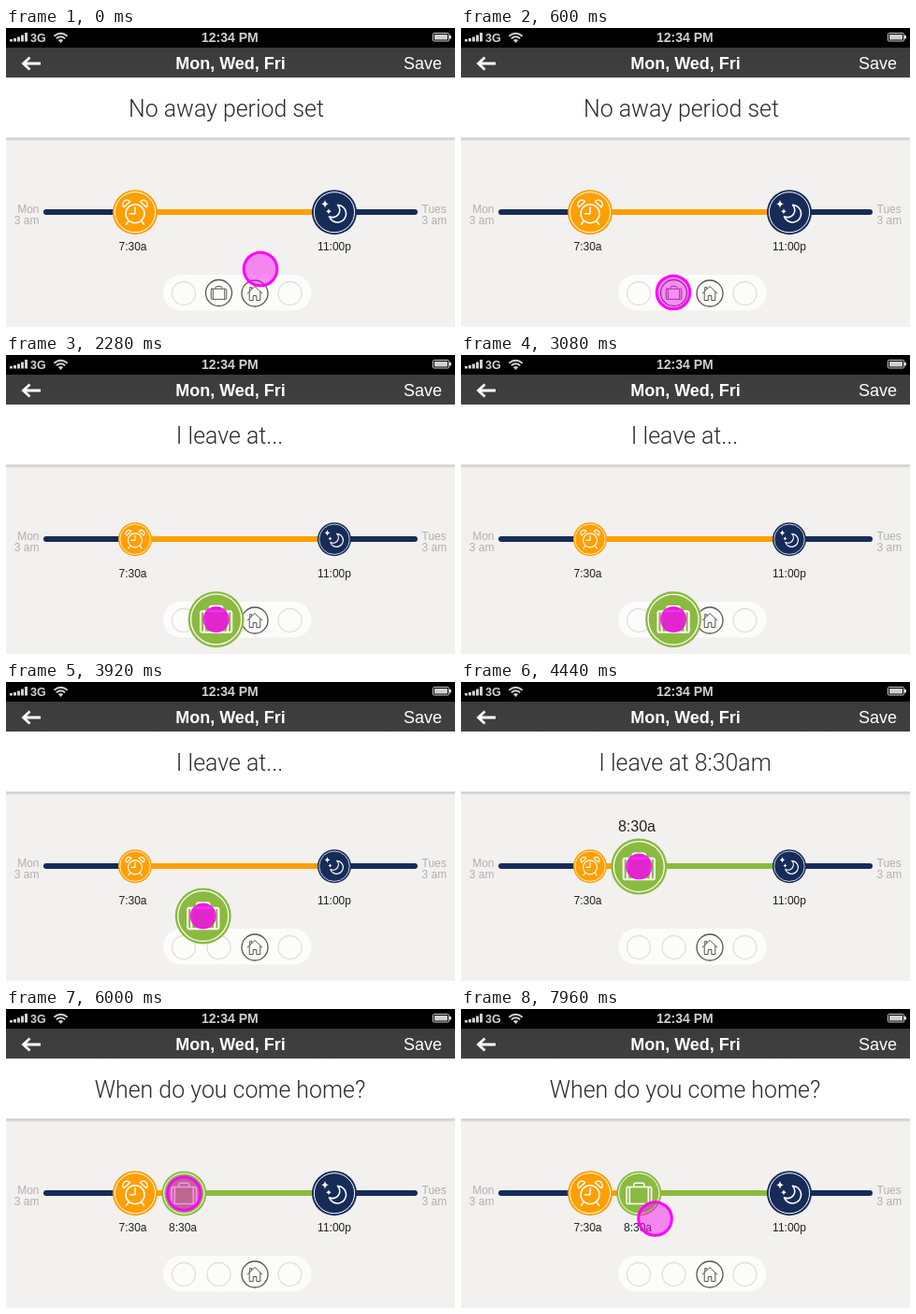
An HTML page for the animation above (8 s loop, 480x320 px).

```html
<!DOCTYPE html>
<html lang="en">
<head>
<meta charset="utf-8">
<title>Away period</title>
<style>
  html, body { margin: 0; width: 100%; height: 100%; overflow: hidden; background: #f2f1ef; }
  svg { display: block; width: 480px; height: 320px; font-family: "Liberation Sans", Arial, sans-serif; }
  .line { fill: none; stroke: currentColor; stroke-linecap: round; stroke-linejoin: round; }
  .title { font: 300 24.9px Roboto, sans-serif; fill: #2b2b2b; text-anchor: middle; }
  .time { font-size: 12px; fill: #222; text-anchor: middle; }
  .end { font-size: 12px; fill: #b1b0ae; }
  .slot { fill: none; stroke: #e0dfdd; stroke-width: 1.3; }
</style>
</head>
<body>
<svg viewBox="0 0 480 320">
  <defs>
    <linearGradient id="bar" x2="0" y2="1">
      <stop offset="0" stop-color="#3b3b3b"/><stop offset="1" stop-color="#404040"/>
    </linearGradient>
    <linearGradient id="shade" x2="0" y2="1">
      <stop offset="0" stop-color="#b9b8b6"/><stop offset="1" stop-color="#f2f1ef"/>
    </linearGradient>
    <g id="badge">
      <circle r="24" fill="currentColor"/>
      <circle r="21.6" fill="none" stroke="#fff"/>
    </g>
    <g id="clock" class="line" stroke-width="1.5">
      <circle cy="1.500" r="10"/>
      <path d="M0-5.500V1.500H-5.500M-7 9.500L-9.500 13M7 9.500L9.500 13"/>
      <path d="M-12-5.500A4.400 4.400 0 0 1-5.500-11.500ZM12-5.500A4.400 4.400 0 0 0 5.500-11.500Z"/>
    </g>
    <g id="moon" class="line" stroke-width="1.6">
      <path d="M3.500-7.800A9.300 9.300 0 1 1-5.500 4.500A7.700 7.700 0 0 0 3.500-7.800Z"/>
      <path fill="currentColor" stroke="none" d="M-10-13.500Q-9.500-9.500-6-9Q-9.500-8.500-10-4.500Q-10.500-8.500-14-9Q-10.500-9.500-10-13.500Z
        M-6-4Q-5.700-1.300-3.200-1Q-5.700-.7-6 2Q-6.300-.7-8.800-1Q-6.300-1.300-6-4Z"/>
    </g>
    <g id="case" class="line" stroke-width="1.6">
      <rect x="-13.300" y="-7" width="26.600" height="18" rx="1.500"/>
      <path d="M-5.500-7.500V-9.500Q-5.500-11.300-3.700-11.300H3.700Q5.500-11.300 5.500-9.500V-7.500M-10-6.500V10.500M10-6.500V10.500"/>
    </g>
    <g id="home" class="line" stroke-width="1">
      <path d="M-7.800 0L0-7.500L7.800 0M-5.800-1.500V7.500H-1.800V2.500H1.800V7.500H5.800V-1.500M-5.300-2.800V-6.500H-3.300V-4.700"/>
    </g>
  </defs>

  <rect width="480" height="320" fill="#f2f1ef"/>
  <rect y="117" width="480" height="4" fill="url(#shade)"/>
  <rect y="53" width="480" height="64.500" fill="#fff"/>
  <rect y="21" width="480" height="32" fill="url(#bar)"/>
  <rect width="480" height="21" fill="#000"/>

  <g fill="#d0d0d0">
    <path d="M4 12h3v2.500h-3zM8 11h3v3.500h-3zM12 9.500h3v5h-3zM16 7.500h3v7h-3zM20 5h3v9.500h-3z"/>
    <text x="26" y="14.500" font-size="12.500" font-weight="700">3G</text>
    <path d="M58.500 16L55.800 13Q58.500 11 61.200 13Z"/>
    <path d="M53.800 11.300Q58.500 7.300 63.200 11.300M51.300 8.700Q58.500 2.900 65.700 8.700" fill="none" stroke="#d0d0d0" stroke-width="1.800"/>
    <text x="239.400" y="14.800" font-size="14" font-weight="700" text-anchor="middle">12:34 PM</text>
    <rect x="456.500" y="5.500" width="17" height="8.500" rx="1" fill="none" stroke="#d0d0d0"/>
    <path d="M458 7h14v5.500h-14zM474 8h2v3.500h-2z"/>
  </g>
  <g fill="#fff">
    <path d="M37 38H19M25.500 31.500L18.500 38L25.500 44.500" fill="none" stroke="#fff" stroke-width="2.800"/>
    <text x="240" y="44" font-size="18" font-weight="700" text-anchor="middle">Mon, Wed, Fri</text>
    <text x="425" y="44" font-size="18">Save</text>
  </g>
  <text id="title" class="title" y="95"></text>

  <g class="end">
    <text x="35.500" y="197.500" text-anchor="end">Mon</text>
    <text x="35.500" y="209.700" text-anchor="end">3 am</text>
    <text x="444.500" y="197.500">Tues</text>
    <text x="444.500" y="209.700">3 am</text>
  </g>
  <g fill="none" stroke-width="6">
    <path d="M43 197H437" stroke="#162b58" stroke-linecap="round"/>
    <path d="M138 197H351" stroke="#ff9f00"/>
    <path id="away" d="M190 197H351" stroke="#8bba40"/>
  </g>
  <text class="time" x="135.500" y="237.500">7:30a</text>
  <text class="time" x="351" y="237.500">11:00p</text>
  <text id="leave" class="time">8:30a</text>

  <g id="wake"><use href="#badge" color="#ff9f00"/><use href="#clock" color="#fff"/></g>
  <g id="night"><use href="#badge" color="#162b58"/><use href="#moon" color="#fff"/></g>

  <rect x="168" y="264" width="158.500" height="38.500" rx="19.200" fill="#fcfcfb"/>
  <circle class="slot" cx="190" cy="284" r="12.500"/>
  <circle class="slot" cx="227.500" cy="284" r="12.500"/>
  <circle class="slot" cx="303.500" cy="284" r="12.500"/>
  <g transform="translate(266 284)" color="#555">
    <circle class="line" r="14" stroke-width="1.300"/>
    <use href="#home"/>
  </g>
  <g id="idle" transform="translate(227.500 283.500)" color="#555">
    <circle r="14" fill="#fcfcfb" stroke="#555" stroke-width="1.300"/>
    <use href="#case" transform="scale(.62)"/>
  </g>
  <g id="bag"><use href="#badge" color="#8bba40"/><use href="#case" color="#fff"/></g>
  <circle id="touch" stroke="#f0f" fill="#f505ee"/>
</svg>

<script>
const LOOP = 8000, STEP = 40;
const $ = id => document.getElementById(id);
const set = (id, attrs) => { for (const k in attrs) $(id).setAttribute(k, attrs[k]); };
const show = (id, on) => set(id, { visibility: on ? 'visible' : 'hidden' });

const linear = p => p;
const easeIn = p => p * p;
const easeOut = p => 1 - (1 - p) ** 2;
const easeBoth = p => p * p * (3 - 2 * p);

// key: [time, value, ease into this key]
function track(keys, t) {
  const i = keys.findIndex(k => k[0] > t);
  if (i < 0) return keys[keys.length - 1][1];
  if (i === 0) return keys[0][1];
  const [t0, a] = keys[i - 1], [t1, b, ease = linear] = keys[i];
  return a + (b - a) * ease((t - t0) / (t1 - t0));
}

const fingerX = [[0, 272], [600, 227, easeOut], [3520, 227], [4360, 192, easeBoth], [4440, 190.3], [7680, 190.3], [7960, 207.5, easeIn]];
const fingerY = [[0, 258], [600, 283, easeOut], [3520, 283], [4360, 213, easeBoth], [4440, 197.5], [7680, 197.5], [7960, 224.5, easeIn]];
const press = [[1400, 0], [1640, 1, easeBoth], [5720, 1], [6000, 0, easeBoth]];
const lift = [[1560, 0], [1880, 1, easeBoth], [5720, 1], [6000, 0, easeBoth]];
const swing = [[2240, 0], [3080, 2 * Math.PI, easeBoth]];

const titles = [
  [5840, 'When do you come home?', 239.5],
  [4400, 'I leave at 8:30am', 239.5],
  [1640, 'I leave at...', 239],
  [0, 'No away period set', 235.5]
];

function finger(t) {
  if (t < 2240 || t > 3080) return [track(fingerX, t), track(fingerY, t)];
  const u = track(swing, t);
  return [243.5 - 61.5 * Math.sin(u + 0.271), 283 - 31 * (1 - Math.cos(u))];
}

const place = (id, x, y, s) => set(id, { transform: `translate(${x} ${y}) scale(${s})` });

function draw(t) {
  const [x, y] = finger(t), held = track(press, t), up = track(lift, t);
  const dropped = t >= 4400, settled = t >= 5840;

  const [, text, mid] = titles.find(k => t >= k[0]);
  if ($('title').textContent !== text) $('title').textContent = text;
  set('title', { x: mid });

  place('wake', 138, 197.2, 1 - up / 4);
  place('night', 351, 197.2, 1 - up / 4);

  show('idle', t < 1600);
  show('bag', t >= 1600);
  const pos = t >= 4440 ? [190.3, 197.5] : [x, y];
  place('bag', ...pos, dropped ? 1 + up / 4 : 0.6 + up * 0.65);

  show('away', dropped);
  show('leave', dropped);
  set('leave', settled ? { x: 189, y: 237.5 } : { x: 188, y: 160 });
  $('leave').style.fontSize = settled ? '12px' : '16px';

  set('touch', {
    cx: x, cy: y,
    r: 17.8 - 4.5 * held,
    'stroke-width': 3 - 1.5 * held,
    'stroke-opacity': 1 - 0.2 * held,
    'fill-opacity': 0.45 + 0.37 * held
  });
}

const start = performance.now();
function tick() {
  const t = (performance.now() - start) % LOOP;
  draw(Math.floor(t / STEP) * STEP);
  requestAnimationFrame(tick);
}
draw(0);
requestAnimationFrame(tick);
</script>
</body>
</html>
```
